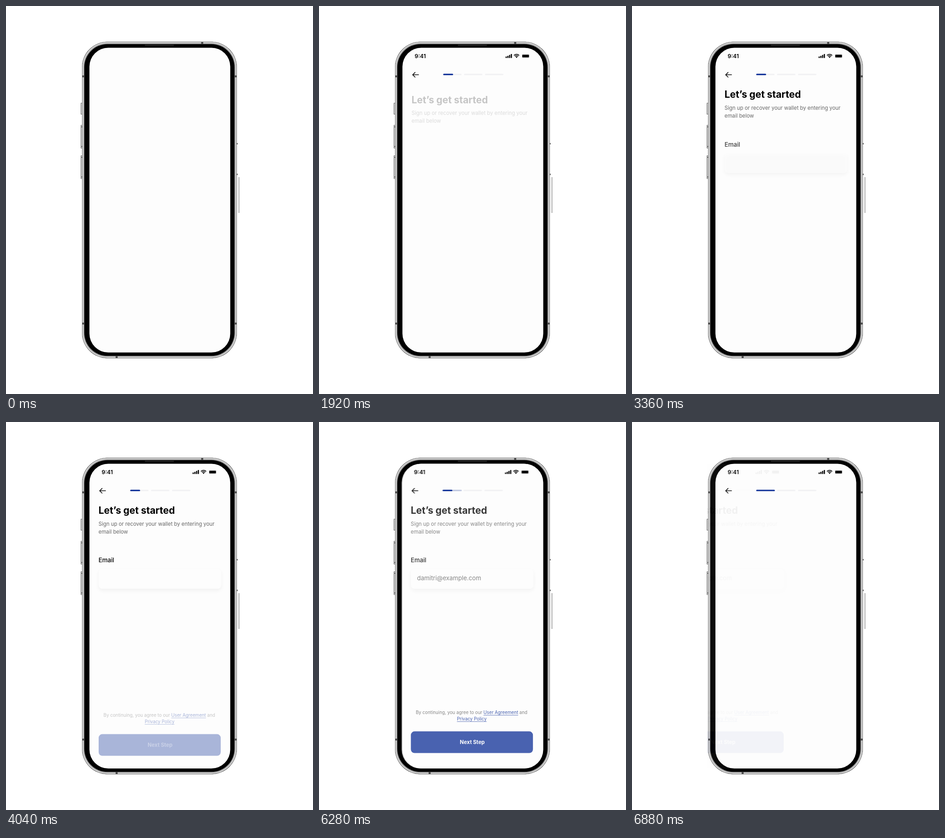
These frames come from a looping animation (666 by 841 pixels, 8000 ms). An HTML page with a canvas:

```html
<!DOCTYPE html>
<html lang="en">
<head>
<meta charset="utf-8">
<title>Sign-up screen</title>
<style>
  html, body { margin: 0; width: 100%; height: 100%; overflow: hidden; background: #fff; }
  canvas { display: block; width: 666px; height: 841px; }
</style>
</head>
<body>
<canvas id="stage" width="666" height="841"></canvas>
<script>
const W = 666, H = 841, LOOP = 8000, STEP = 40;
const BLUE = '#17379b', GREY = '#666', PAPER = '#fdfdfd';
const EMAIL = 'damitri@example.com';
const SCREEN = [181, 90.5, 305.5, 660.5, 41];

const TIMES = { header: 740, title: 1740, email: 2740, footer: 3740, typing: 4588, leave: 6100, rest: 6880 };

const stage = document.getElementById('stage').getContext('2d');
const sheet = document.createElement('canvas');
sheet.width = W;
sheet.height = H;
const layer = sheet.getContext('2d');

const clamp = v => Math.min(1, Math.max(0, v));

function box(c, x, y, w, h, r, fill) {
  c.beginPath();
  c.roundRect(x, y, w, h, r);
  c.fillStyle = fill;
  c.fill();
}

function text(c, str, x, y, size, weight, color) {
  c.font = `${weight} ${size}px Inter, sans-serif`;
  c.fillStyle = color;
  c.fillText(str, x, y);
  return c.measureText(str).width;
}

function path(c, width, color, ...points) {
  c.beginPath();
  points.forEach(([x, y], i) => i ? c.lineTo(x, y) : c.moveTo(x, y));
  c.lineWidth = width;
  c.strokeStyle = color;
  c.stroke();
}

// Fades a group in while it rises to its place.
function enter(c, t, start, draw) {
  const age = t - start;
  if (age <= 0) return;
  c.save();
  c.globalAlpha = clamp(age / 820);
  c.translate(0, 25 * (1 - clamp(age / 1000)) ** 4);
  draw(c);
  c.restore();
}

function statusIcons(c) {
  [3.2, 4.9, 6.8, 8.8].forEach((h, i) => box(c, 404.8 + i * 3.75, 112.8 - h, 2.5, h, 0.7, '#000'));

  const cx = 428.6, cy = 112.7, from = -Math.PI * 0.75, to = -Math.PI * 0.25;
  c.strokeStyle = c.fillStyle = '#000';
  c.lineWidth = 1.7;
  for (const r of [8, 5.1]) {
    c.beginPath();
    c.arc(cx, cy, r, from, to);
    c.stroke();
  }
  c.beginPath();
  c.moveTo(cx, cy);
  c.arc(cx, cy, 3, from, to);
  c.fill();

  c.beginPath();
  c.roundRect(439.4, 104, 17.6, 8.8, 2.4);
  c.lineWidth = 0.7;
  c.strokeStyle = 'rgba(0,0,0,.09)';
  c.stroke();
  box(c, 440.9, 105.5, 14.6, 5.9, 1, '#000');
}

function header(c, progress) {
  text(c, '9:41', 207.5, 113.3, 12.1, 600, '#000');
  statusIcons(c);
  c.lineCap = c.lineJoin = 'round';
  path(c, 1.5, '#111', [216, 149.1], [203.4, 149.1]);
  path(c, 1.5, '#111', [208.5, 143.9], [203.2, 149.1], [208.5, 154.3]);
  for (let i = 0; i < 3; i++) box(c, 269.4 + i * 45.4, 146.8, 39.8, 3.2, 1.6, '#f2f2f4');
  box(c, 269.4, 146.8, progress, 3.2, 1.6, BLUE);
}

function title(c) {
  text(c, 'Let’s get started', 200.7, 199.4, 20.9, 700, '#000');
  text(c, 'Sign up or recover your wallet by entering your', 200.8, 225, 11.35, 400, GREY);
  text(c, 'email below', 200.8, 241.8, 11.35, 400, GREY);
}

function emailField(c) {
  text(c, 'Email', 200.8, 304.1, 13.2, 500, '#000');
  c.save();
  c.shadowColor = 'rgba(0,0,0,.05)';
  c.shadowBlur = 9;
  c.shadowOffsetY = 4;
  box(c, 201, 318, 266, 43.5, 8, PAPER);
  c.restore();
}

function link(c, str, x, y) {
  const width = text(c, str, x, y, 9.75, 400, BLUE);
  c.fillStyle = BLUE;
  c.fillRect(x, y + 1.6, width, 0.8);
  return width;
}

function footer(c) {
  let x = 211.6;
  x += text(c, 'By continuing, you agree to our ', x, 633.4, 9.75, 400, GREY);
  x += link(c, 'User Agreement', x, 633.4);
  text(c, ' and', x, 633.4, 9.75, 400, GREY);
  link(c, 'Privacy Policy', 300.9, 647.3);
  box(c, 201, 670.6, 264.8, 47, 8, BLUE);
  c.textAlign = 'center';
  text(c, 'Next Step', 334.2, 698.1, 11.3, 700, '#fff');
}

function signUp(c, t) {
  enter(c, t, TIMES.header, g => header(g, 21.6));
  enter(c, t, TIMES.title, title);
  enter(c, t, TIMES.email, emailField);
  enter(c, t, TIMES.footer, footer);
  const typed = Math.max(0, Math.floor((t - TIMES.typing) / 50));
  text(c, EMAIL.slice(0, typed), 214.5, 343, 13.2, 400, GREY);
}

function sideKey(c, x, y, w, h) {
  box(c, x, y, w, h, 0.8, '#555');
  box(c, x + 0.8, y + 0.8, w - 1.2, h - 1.6, 0.4, '#d6d6d6');
}

function phone(c) {
  sideKey(c, 162, 210, 3.6, 25);
  for (const y of [258, 324]) {
    sideKey(c, 162, y, 3.6, 50.5);
    box(c, 163.8, y + 3, 1.4, 2, 0.5, '#222');
    box(c, 163.8, y + 45.5, 1.4, 2, 0.5, '#222');
  }
  box(c, 503.7, 371.2, 3.3, 77, 0.8, '#aaa');
  box(c, 504.4, 371.9, 1.9, 75.6, 0.5, '#dcdcdc');
  for (const y of [298.5, 365]) box(c, 500.4, y - 1.4, 1.8, 2.8, 0.7, '#111');

  const rings = [[0, '#555'], [0.9, '#f4f4f4'], [2.4, '#999'], [3.3, '#c9c9c9'], [4.2, '#6a6a6a'], [5.1, '#000']];
  for (const [d, color] of rings) box(c, 165, 77.7, 335.6, 685.6, 55, '#fff') || ring(c, d, color);

  c.fillStyle = '#4a4a4a';
  for (const y of [150.5, 686.3]) {
    c.fillRect(165.4, y, 5, 4);
    c.fillRect(495.4, y, 5, 4);
  }
  c.fillRect(423.4, 78, 4.4, 5);
  c.fillRect(237.8, 758, 4.4, 5);
  box(c, 301, 84, 63.5, 2, 1, '#262626');
  box(c, ...SCREEN, PAPER);
}

function ring(c, d, color) {
  for (const [inset, fill] of [[0, '#555'], [0.9, '#f4f4f4'], [2.4, '#999'], [3.3, '#c9c9c9'], [4.2, '#6a6a6a'], [5.1, '#000']]) {
    if (inset > d) break;
    box(c, 165 + inset, 77.7 + inset, 335.6 - 2 * inset, 685.6 - 2 * inset, 55 - inset, fill);
  }
}

// The first screen slides away and fades above the next one.
function leave(t) {
  const p = (Math.min(t, TIMES.rest) - TIMES.leave) / 815;
  stage.save();
  header(stage, 40.6);
  stage.restore();

  layer.clearRect(0, 0, W, H);
  layer.save();
  layer.translate(-156 * p ** 3, 0);
  box(layer, ...SCREEN, PAPER);
  signUp(layer, t);
  layer.restore();

  stage.save();
  stage.beginPath();
  stage.rect(162, 78, 345, 685);
  stage.clip();
  stage.globalAlpha = 1 - p;
  stage.drawImage(sheet, 0, 0);
  stage.restore();
}

function render(now) {
  const t = Math.floor((now % LOOP) / STEP) * STEP;
  stage.fillStyle = '#fff';
  stage.fillRect(0, 0, W, H);
  phone(stage);
  if (t > TIMES.leave) leave(t);
  else signUp(stage, t);
}

function tick() {
  render(performance.now());
  requestAnimationFrame(tick);
}
tick();
</script>
</body>
</html>
```
